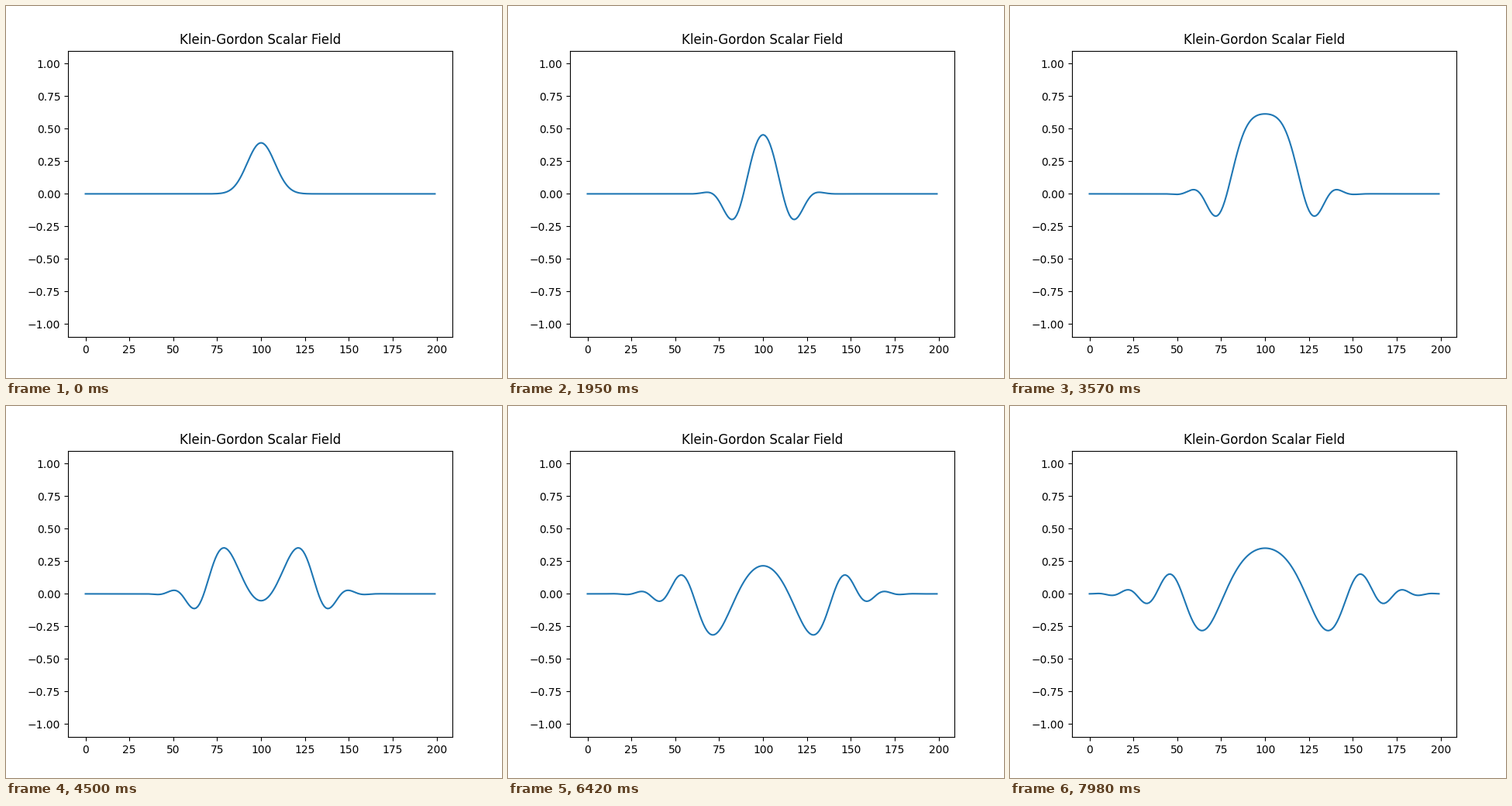
Animation, 640 px wide and 480 px high, one loop 8 s. Source, as a matplotlib script:

```python
import numpy as np
import matplotlib.pyplot as plt
from matplotlib.animation import FuncAnimation

SIZE = 200        # grid points, spacing 1
DT = 0.5
MASS = 0.5
WARMUP = 4        # steps taken before the first frame
FRAMES = 267
LOOP_MS = 8000


def evolve(count):
    """Leapfrog steps of the massive wave equation on a periodic grid."""
    x = np.arange(SIZE)
    phi = np.exp(-((x - SIZE / 2) ** 2) / 100)
    pi = np.zeros(SIZE)
    states = [phi]
    for _ in range(count - 1):
        laplacian = np.roll(phi, 1) + np.roll(phi, -1) - 2 * phi
        pi = pi + DT * (laplacian - MASS ** 2 * phi)
        phi = phi + DT * pi
        states.append(phi)
    return states


states = evolve(WARMUP + FRAMES)[WARMUP:]

fig, ax = plt.subplots(figsize=(6.4, 4.8), dpi=100)
line, = ax.plot(states[0])
ax.set_ylim(-1.1, 1.1)
ax.set_title("Klein-Gordon Scalar Field")


def update(frame):
    line.set_ydata(states[frame])
    return line,


anim = FuncAnimation(fig, update, frames=FRAMES, interval=LOOP_MS / FRAMES,
                     repeat=True, repeat_delay=0)
plt.show()
```
